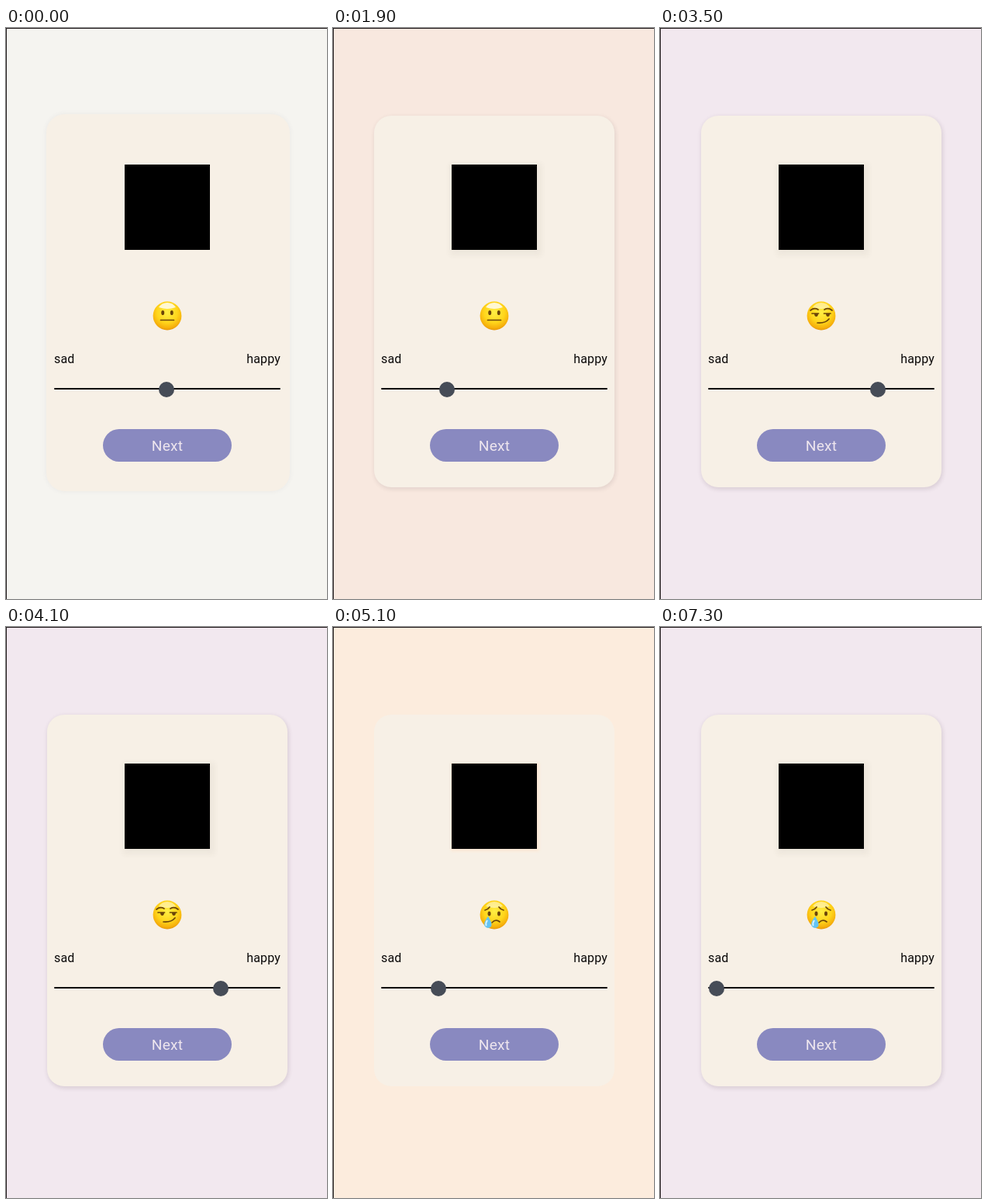
Animation, 414 px wide and 736 px high, one loop 7400 ms. Source, as an HTML page:

```html
<!DOCTYPE html>
<html lang="en">
<head>
<meta charset="utf-8">
<title>Mood slider</title>
<style>
  html, body { margin: 0; width: 100%; height: 100%; overflow: hidden; }
  #stage { position: relative; width: 414px; height: 736px; overflow: hidden; font: 16px Roboto, sans-serif; letter-spacing: .15px; color: #0b0909; }
  #stage > * { position: absolute; box-sizing: border-box; }
  #frame { inset: 0; border: solid #241d1f; border-width: 1px 0 0 1px; }
  #card { left: 53px; top: 113px; width: 310px; height: 479px; border-radius: 22px; background: #f7f0e6; }
  #card.idle { left: 52px; top: 111px; width: 314px; height: 486px; border-radius: 24px; }
  #picture { left: 153px; top: 176px; width: 110px; height: 110px; background: #000; }
  .label { top: 417px; line-height: 19px; }
  #track { left: 62px; top: 464px; width: 292px; height: 2px; border-radius: 1px; background: #080608; }
  #thumb { left: -10px; top: 456px; width: 20px; height: 20px; border-radius: 50%; background: #464c57; }
  #next { left: 125px; top: 517px; width: 166px; height: 42px; border-radius: 21px; background: #8989c0; text-align: center; font-size: 19.2px; line-height: 43px; }
  #emoji { left: 188px; top: 351px; }
  .line { fill: none; stroke: #6b4509; stroke-linecap: round; stroke-width: 1.7; }
  .eye { fill: #6b4509; }
</style>
</head>
<body>
<div id="stage">
  <div id="card"></div>
  <div id="picture"></div>
  <svg id="emoji" width="40" height="40" viewBox="-20 -20 40 40">
    <defs>
      <radialGradient id="skin" cx=".5" cy=".38" r=".66">
        <stop offset="0" stop-color="#ffee45"/>
        <stop offset=".55" stop-color="#ffd51b"/>
        <stop offset=".85" stop-color="#f5ad0b"/>
        <stop offset="1" stop-color="#d98505"/>
      </radialGradient>
    </defs>
    <circle r="18.4" fill="url(#skin)"/>
    <path id="shine"/>
    <g id="neutral">
      <ellipse class="eye" cx="-5.8" cy="-4" rx="2" ry="3.1"/>
      <ellipse class="eye" cx="5.8" cy="-4" rx="2" ry="3.1"/>
      <path class="line" d="M-8.5 5.5H8.5"/>
    </g>
    <g id="crying">
      <ellipse class="eye" cx="-6.5" cy="-1.5" rx="2" ry="3"/>
      <ellipse class="eye" cx="6" cy="-1.5" rx="2" ry="3"/>
      <path class="line" d="M-12-6Q-8-7-6-10M6-10Q8-7 12-6M-3 10Q2 5 7 9"/>
      <path d="M-8 2Q-15 11-12 15Q-8 19-4 15Q-2 11-8 2" fill="#63c4f4"/>
      <path d="M-9 7Q-12 12-10 14" fill="none" stroke="#d8f4ff" stroke-width="2"/>
    </g>
    <g id="smirking">
      <path class="line" d="M-14-7Q-9-11-4-8M4-8Q9-11 14-7M-12-3H-3.5M3.5-3H12M-5 9Q5 10 10 4"/>
      <path class="eye" d="M-9-3H-4Q-4 1-6.5 1T-9-3M6-3H11Q11 1 8.5 1T6-3"/>
    </g>
  </svg>
  <div class="label" style="left:62px">sad</div>
  <div class="label" style="right:60px">happy</div>
  <div id="track"></div>
  <div id="thumb"></div>
  <div id="next">Next</div>
  <div id="frame"></div>
</div>
<script>
const LOOP = 7400, START = 700, CYCLE = 4000;
const $ = id => document.getElementById(id);

const tint = [
  [0, [252, 247, 240]], [150, [252, 247, 240]], [500, [252, 232, 213]],
  [2340, [242, 232, 239]], [CYCLE, [242, 232, 239]]
];
const drag = [
  [0, [207]], [700, [207]], [1200, [208]], [1300, [208]], [2400, [97]], [2600, [97]],
  [3500, [281]], [3800, [300]], [4200, [270]], [4800, [182]], [5400, [90]],
  [5600, [90]], [6200, [73]], [LOOP, [73]]
];

function sample(keys, time) {
  const i = Math.max(1, keys.findIndex(key => key[0] > time));
  const [t0, from] = keys[i - 1], [t1, to] = keys[i];
  return from.map((v, k) => v + (to[k] - v) * (time - t0) / (t1 - t0));
}

function draw(time) {
  const idle = time < START;
  const phase = idle ? 0 : (time - START) % CYCLE;
  const color = idle ? '#f5f4f0' : `rgb(${sample(tint, phase).map(Math.round)})`;
  const merged = !idle && phase < 200;
  const depth = idle ? 0 : Math.min(1, Math.max(0, (phase - 500) / 900));

  $('stage').style.background = color;
  $('card').className = idle ? 'idle' : '';
  $('card').style.visibility = merged ? 'hidden' : 'visible';
  $('card').style.boxShadow = idle
    ? '0 0 4px 2px rgba(90,90,110,.045)'
    : `1px 2px 5px 1px rgba(70,45,60,${.13 * depth})`;
  $('picture').style.boxShadow = idle || merged ? 'none'
    : phase < 700 ? '1px 1px 3px 2px #fce8d5'
    : '2px 3px 7px 4px rgba(80,80,60,.055)';

  const [x] = sample(drag, time);
  $('thumb').style.transform = `translateX(${Math.round(x)}px)`;
  const mood = x < 140 ? 'crying' : x < 245 ? 'neutral' : 'smirking';
  for (const name of ['neutral', 'crying', 'smirking'])
    $(name).style.display = name === mood ? '' : 'none';

  const washed = !idle && mood === 'neutral' && phase < 1000;
  $('shine').setAttribute('d', washed
    ? 'M-15-4Q-13-17 0-17T15-4L10 2L8 8H-8L-10 2Z'
    : 'M-11-11Q-7-17 0-17T11-11Q0-7-11-11');
  $('shine').setAttribute('fill', washed ? '#faf3e6' : '#fffbe6');
  $('shine').setAttribute('opacity', washed ? 1 : mood === 'neutral' ? .9 : .55);
  $('next').style.color = merged ? '#fcf7f0' : '#eee6ee';
}

function tick() {
  draw(performance.now() % LOOP);
  requestAnimationFrame(tick);
}
tick();
</script>
</body>
</html>
```
